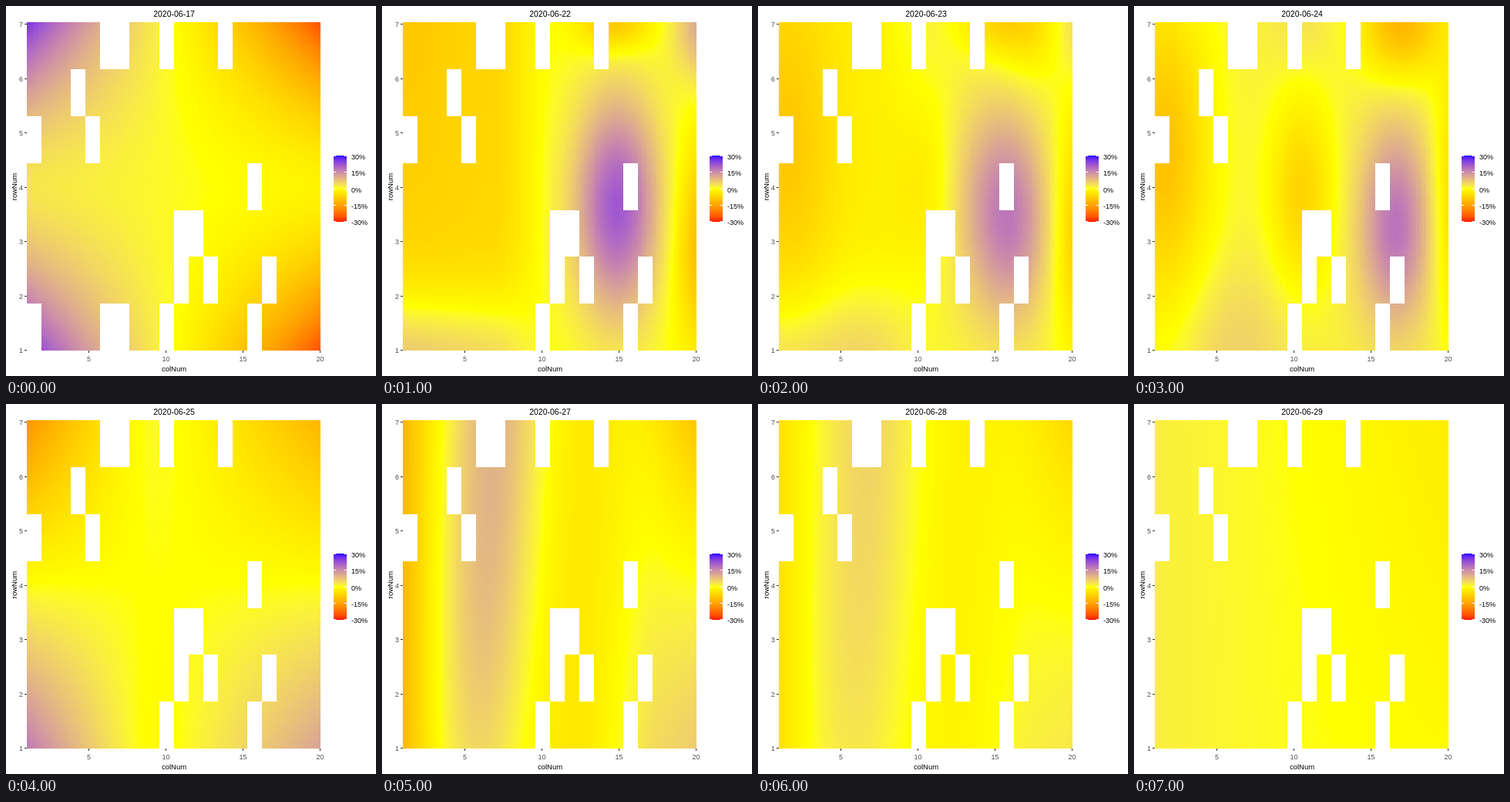
Write an HTML page with a canvas that moves like this. It is 480x480 px and loops after 8 s.

```html
<!DOCTYPE html>
<html lang="en">
<head>
<meta charset="utf-8">
<title>Heat map by date</title>
<style>
html, body { margin: 0; width: 480px; height: 480px; overflow: hidden; background: #fff; }
canvas, svg { position: absolute; display: block; }
canvas { image-rendering: pixelated; }
#map { left: 27px; top: 21px; width: 381px; height: 426px; }
#bar { left: 425px; top: 194px; width: 17px; height: 86px; }
svg { left: 0; top: 0; }
text { font-family: "Liberation Sans", Arial, sans-serif; }
</style>
</head>
<body>
<canvas id="map" width="100" height="100"></canvas>
<canvas id="bar" width="1" height="86"></canvas>
<svg id="art" width="480" height="480" viewBox="0 0 480 480"></svg>
<script>
const LOOP = 8000, STEP = 1000, N = 100;
const LEFT = 27, TOP = 21, COL = 19.07, ROW = 60.886;

const bell = (t, center, width) => Math.exp(-(((t - center) / width) ** 2));
const smooth = (t, a, b) => {
  t = Math.min(1, Math.max(0, (t - a) / (b - a)));
  return t * t * (3 - 2 * t);
};

// Each day's surface in percent; u runs 0..1 rightwards, v 0..1 downwards.
function saddle(u, v) {
  const s = 2 * u - 1, edge = Math.abs(2 * v - 1) ** 1.6;
  return (.7 - 2.6 * s) * (1 - edge) - (20 * s + 6 * s ** 3) * edge;
}

function tallHill(u, v) {
  const plain = (-6.5 + (14 - 8 * u) * bell(v, 1.05, .22)) * (1 - smooth(u, .3, .52));
  const corner = -2.5 * bell(u, 0, .2) * (1 - v);
  const hill = 21.5 * bell(u, .73, .145) * bell(v, .56, .33);
  const dip = -10 * bell(u, .72, .12) * bell(v, 0, .09);
  const edge = 12 * bell(u, 1.03, .1) * (bell(v, 0, .17) - bell(v, .68, .3));
  return plain + corner + hill + dip + edge;
}

function hillAndHollow(u, v) {
  const sides = -12 * bell(u, .03, .16) * bell(v, .4, .5)
    - 10 * bell(u, 1.03, .08) * bell(v, .55, .4);
  const hollow = -9 * bell(u, .5, .11) * bell(v, .52, .3);
  const hill = 16 * bell(u, .82, .12) * bell(v, .62, .3);
  const dip = -14 * bell(u, .84, .14) * bell(v, 0, .17);
  const rims = 4 * bell(u, .27, .2) * bell(v, 1, .25) + 2 * bell(u, .5, .1) * bell(v, 0, .15);
  return 2 + sides + hollow + hill + dip + rims;
}

function twist(u, v) {
  const t = u - .44, slope = t < 0 ? 48 : 26;
  return (slope * (Math.hypot(t, .08) - .08) - .7) * (2 * v - 1);
}

function ridge(u, v) {
  const crest = (14 - 5 * v * v) * bell(u, .31 - .05 * v, .17);
  const left = -10 * bell(u, -.05, .12);
  const right = smooth(u, .58, .88) * (2.5 + 5.5 * v)
    + smooth(u, .75, 1.1) * (3 * v - 10 * (1 - v) ** 2);
  return crest + left + right - 4;
}

const slope = (u, v) => 2.1 - 4 * u - 1.1 * u * u * (1 - 2 * v);

const mean = (f, g) => (u, v) => (f(u, v) + g(u, v)) / 2;

const days = [
  [17, saddle], [22, tallHill], [23, mean(tallHill, hillAndHollow)], [24, hillAndHollow],
  [25, twist], [27, ridge], [28, mean(ridge, slope)], [29, slope]
];

// Colour scale, blended in Lab.
const YELLOW = [97.139, -21.554, 94.478];
const BLUE = [32.297, 79.188, -107.86];
const RED = [53.241, 80.092, 67.203];

function labToRgb([L, a, b]) {
  const inv = t => t > 6 / 29 ? t ** 3 : (t - 4 / 29) * 108 / 841;
  const f = (L + 16) / 116;
  const x = .95047 * inv(f + a / 500), y = inv(f), z = 1.08883 * inv(f - b / 200);
  return [3.2406 * x - 1.5372 * y - .4986 * z,
          -.9689 * x + 1.8758 * y + .0415 * z,
          .0557 * x - .204 * y + 1.057 * z].map(c => {
    c = Math.min(1, Math.max(0, c));
    return Math.round(255 * (c > .0031308 ? 1.055 * c ** (1 / 2.4) - .055 : 12.92 * c));
  });
}

function color(pct) {
  const t = Math.min(1, Math.abs(pct) / 30), end = pct > 0 ? BLUE : RED;
  return labToRgb(YELLOW.map((c, i) => c + (end[i] - c) * t));
}

function paint(id, value) {
  const canvas = document.getElementById(id), { width: w, height: h } = canvas;
  const ctx = canvas.getContext("2d"), img = ctx.createImageData(w, h);
  for (let y = 0; y < h; y++)
    for (let x = 0; x < w; x++)
      img.data.set([...color(value((x + .5) / w, (y + .5) / h)), 255], (y * w + x) * 4);
  ctx.putImageData(img, 0, 0);
}

const art = document.getElementById("art");

function add(tag, attrs, text = "") {
  const el = document.createElementNS("http://www.w3.org/2000/svg", tag);
  for (const k in attrs) el.setAttribute(k, attrs[k]);
  el.textContent = text;
  art.appendChild(el);
  return el;
}
const rect = (x, y, width, height, fill) => add("rect", { x, y, width, height, fill });
const label = (x, y, size, anchor, fill, text, more = {}) =>
  add("text", { x, y, "font-size": size, "text-anchor": anchor, fill, ...more }, text);

// Empty cells, one list of columns per row.
function gap(row, col) {
  const px = c => Math.round(LEFT + c * COL), py = r => Math.round(TOP + r * ROW);
  return rect(px(col), py(row), px(col + 1) - px(col), py(row + 1) - py(row), "#fff");
}
[[5, 6, 9, 13], [3], [0, 4], [15], [10, 11], [10, 12, 16], [9, 15]]
  .forEach((cols, row) => cols.forEach(col => gap(row, col)));
const firstDayGaps = [0, 5, 6].map(col => gap(6, col));

for (let n = 1; n <= 7; n++) {
  const y = Math.round(446 - (n - 1) * 70.5);
  rect(24, y, 3, 1, "#333");
  label(22, y + 4, 9, "end", "#4d4d4d", n);
}
for (let n = 5; n <= 20; n += 5) {
  const x = Math.round(27.4 + (n - 1) * 20);
  rect(x, 447, 1, 3, "#333");
  label(x + .5, 461, 9, "middle", "#4d4d4d", n);
}
label(218, 474, 9.5, "middle", "#000", "colNum");
label(0, 0, 9.5, "middle", "#000", "rowNum", { transform: "translate(14 234.5) rotate(-90)" });

for (let i = 0; i < 5; i++) {
  const y = Math.round(194 + i * 21.25);
  rect(425, y, 3.4, 1, "#fff");
  rect(438.6, y, 3.4, 1, "#fff");
  label(448, y + 5, 9, "start", "#000", 30 - 15 * i + "%");
}
const title = label(218, 14, 10.5, "middle", "#000", "");

paint("bar", (u, v) => 30 - 60 * v);

let shown = -1;

function draw(ms) {
  const i = Math.floor(ms % LOOP / STEP);
  if (i === shown) return;
  shown = i;
  const [day, surface] = days[i];
  paint("map", surface);
  title.textContent = "2020-06-" + day;
  firstDayGaps.forEach(g => g.setAttribute("visibility", i ? "hidden" : "visible"));
}

const start = performance.now();
function tick() {
  draw(performance.now() - start);
  requestAnimationFrame(tick);
}
tick();
</script>
</body>
</html>
```
